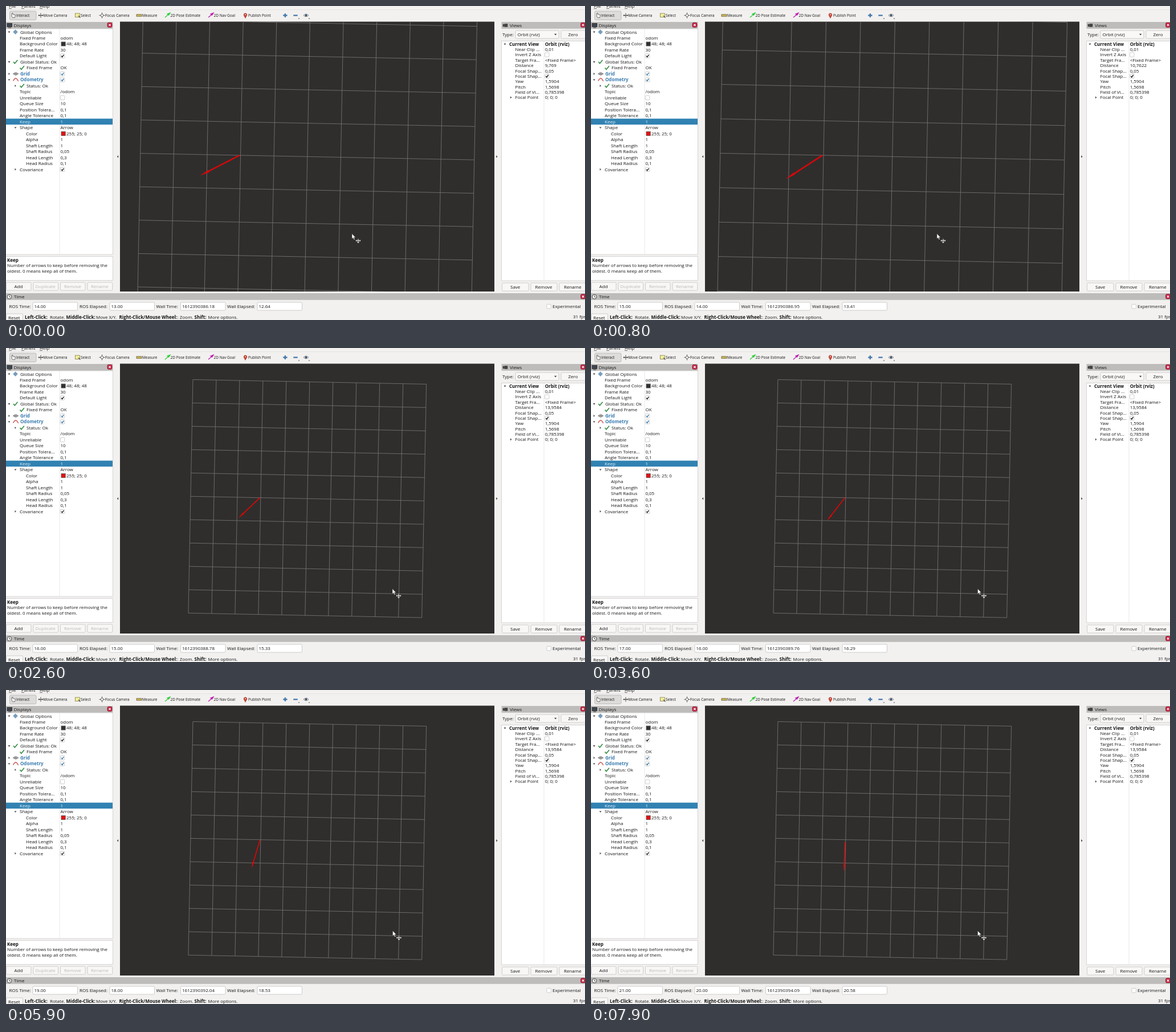
Animation, 1016 px wide and 551 px high, one loop 8 s. Source, as an HTML page:

```html
<!DOCTYPE html>
<html lang="en">
<head>
<meta charset="utf-8">
<title>Odometry view</title>
<style>
html, body { margin: 0; width: 100%; height: 100%; overflow: hidden; background: #f2f1f0; }
svg { display: block; width: 1016px; height: 551px; }
text { font: 8px "Open Sans", "Noto Sans", sans-serif; fill: #161616; white-space: pre; }
.b { font-weight: 700; }
.s { font-size: 6.5px; }
.blue { fill: #3a7cb0; }
.off { fill: #bab8b6; }
.sel { fill: #e4f0f8; }
</style>
</head>
<body>
<svg id="stage" viewBox="0 0 1016 551"></svg>
<script>
const out = [];
const put = s => out.push(s);
const text = (x, y, s, cls = '', id = '') =>
  put(`<text x="${x}" y="${y}" class="${cls}" id="${id}">${s.replace(/</g, '&lt;')}</text>`);
const rect = (x, y, w, h, fill, stroke = 'none', r = 0) =>
  put(`<rect x="${x}" y="${y}" width="${w}" height="${h}" rx="${r}" fill="${fill}" stroke="${stroke}" stroke-width=".8"/>`);
const path = (d, stroke, w = 1, fill = 'none') =>
  put(`<path d="${d}" fill="${fill}" stroke="${stroke}" stroke-width="${w}"/>`);
const dot = (x, y, r, fill, stroke = 'none') =>
  put(`<circle cx="${x}" cy="${y}" r="${r}" fill="${fill}" stroke="${stroke}"/>`);

const open = (x, y) => path(`M${x - 2} ${y - 1}h4l-2 2.6z`, 'none', 0, '#444');
const shut = (x, y) => path(`M${x - 1} ${y - 2}v4l2.4 -2z`, 'none', 0, '#444');
const tick = (x, y) => path(`M${x - 3.5} ${y}l2.4 2.8l5 -6`, '#2b8a3a', 1.5);

function check(x, y, on, color = '#222') {
  rect(x - 3.7, y - 3.7, 7.4, 7.4, '#fff', '#c4c2c0', 1);
  if (on) path(`M${x - 2.1} ${y}l1.6 2l2.8 -4`, color, 1.4);
}
function button(x, y, w, label, tx, cls = '') {
  rect(x, y, w, 14, '#f8f7f6', '#c5c3c1', 1.5);
  text(tx, y + 9.8, label, cls);
}
function bar(x, y, w) { rect(x, y, w, 11.8, '#bdbcbb'); }
function close(x, y) {
  rect(x - 4, y - 4, 8, 8, '#c9203f', '#8c1a30', 2);
  path(`M${x - 1.7} ${y - 1.7}l3.4 3.4m0 -3.4l-3.4 3.4`, '#fff', 1.1);
}

function toolbar() {
  [[5, 'File'], [27, 'Panels'], [59, 'Help']].forEach(([x, s]) => {
    text(x, 2.8, s);
    path(`M${x} 4.4h5`, '#333', .7);
  });
  path('M0 6.5H1016', '#e2e0de', .8);
  rect(6.5, 9, 46.5, 15.5, '#dddcda', '#b4b2b0', 2);
  path('M10 13v5l1.5 2.5h4l1 -5l-4.6 -.8v-2.4z', '#555', .8, '#f5f5f5');
  path('M57 16.5h8m-4 -4v8m-4 -4l1.5 -1.5m-1.5 1.5l1.5 1.5m6.5 -1.5l-1.5 -1.5m1.5 1.5l-1.5 1.5', '#444', 1);
  rect(121.5, 13, 8, 6.5, '#f3ef9c', '#807d40');
  path('M127 17l3.5 3.5', '#555', 1.2);
  dot(168.5, 16.5, 2.5, 'none', '#777');
  path('M163.5 16.5h3m4 0h3m-5 -5v3m0 4v3', '#555', 1);
  rect(229, 14.8, 9, 3.4, '#c9b45c', '#6e6335');
  const ray = (x, c) => path(`M${x} 20l6 -5M${x + 4} 14l5 -2l-2.5 4z`, c, 1.3, c);
  ray(279, '#2fce3b');
  ray(355, '#c01bb0');
  path('M420 21.5c-1 -2.6 -2.8 -4 -2.8 -6a2.8 2.8 0 0 1 5.6 0c0 2 -1.8 3.4 -2.8 6z', '#9c3326', .5, '#c8402f');
  dot(420, 15.2, 1, '#f7dcd8');
  path('M486.3 16.5h7.2m-3.6 -3.6v7.2', '#4679ad', 2.3);
  path('M504.3 16.5h7.4', '#4679ad', 2.3);
  path('M522 16.5q4.5 -5 9 0q-4.5 4.5 -9 0z', '#777', .9, '#eee');
  dot(526.5, 16.3, 1.9, '#35506e');
  [514, 532].forEach(x => path(`M${x - 1.4} 21.5h2.8l-1.4 1.6z`, 'none', 0, '#444'));
  [[18, 'Interact'], [65.5, 'Move Camera'], [131, 'Select'], [174, 'Focus Camera'], [239, 'Measure'],
   [288.5, '2D Pose Estimate'], [364.5, '2D Nav Goal'], [425, 'Publish Point']]
    .forEach(([x, s]) => text(x, 18.9, s, 's'));
}

// rows: indent, name, value, class, arrow ("v" open, ">" shut), checkbox (0 or 1)
const displays = [
  [25, 'Global Options', '', '', 'v'],
  [24, 'Fixed Frame', 'odom'],
  [24, 'Background Color', '48; 48; 48'],
  [24, 'Frame Rate', '30'],
  [24, 'Default Light', '', '', '', 1],
  [25, 'Global Status: Ok', '', '', 'v'],
  [36, 'Fixed Frame', 'OK'],
  [25, 'Grid', '', 'b blue', '>', 1],
  [25, 'Odometry', '', 'b blue', 'v', 1],
  [36, 'Status: Ok', '', '', '>'],
  [24, 'Topic', '/odom'],
  [24, 'Unreliable', '', '', '', 0],
  [24, 'Queue Size', '10'],
  [24, 'Position Tolera...', '0,1'],
  [24, 'Angle Tolerance', '0,1'],
  [24, 'Keep', '1', 'sel'],
  [24, 'Shape', 'Arrow', '', 'v'],
  [35, 'Color', '255; 25; 0'],
  [35, 'Alpha', '1'],
  [35, 'Shaft Length', '1'],
  [35, 'Shaft Radius', '0,05'],
  [35, 'Head Length', '0,3'],
  [35, 'Head Radius', '0,1'],
  [24, 'Covariance', '', '', '>', 1]
];
const views = [
  [883, 'Current View', 'Orbit (rviz)', 'b', 'v'],
  [893.5, 'Near Clip ...', '0,01'],
  [893.5, 'Invert Z Axis', '', '', '', 0],
  [893.5, 'Target Fra...', '<Fixed Frame>'],
  [893.5, 'Distance', '9,769'],
  [893.5, 'Focal Shap...', '0,05'],
  [893.5, 'Focal Shap...', '', '', '', 1],
  [893.5, 'Yaw', '1,5904'],
  [893.5, 'Pitch', '1,5698'],
  [893.5, 'Field of Vi...', '0,785398'],
  [893.5, 'Focal Point', '0; 0; 0', '', '>']
];

function tree(rows, y0, pitch, valueX, arrowX) {
  rows.forEach(([x, name, value, cls = '', arrow, box], i) => {
    const y = y0 + pitch * i;
    if (cls === 'sel') rect(0, y - 5.3, 187, 10.5, '#3182b2');
    text(x, y + 2.9, name, cls);
    const swatch = { '48; 48; 48': '#303030', '255; 25; 0': '#e60f10' }[value];
    if (swatch) rect(97, y - 3.5, 7.2, 7, swatch, '#555');
    if (value) text(valueX + (swatch ? 10.5 : 0), y + 2.9, value, cls, name === 'Distance' ? 'dist' : '');
    if (arrow) (arrow === 'v' ? open : shut)(arrowX(x), y);
    if (box !== undefined) check(valueX + 3.6, y, box, cls ? '#4380ae' : '#222');
  });
}

function leftPanel() {
  bar(0, 28, 187.5);
  rect(2, 30.5, 8.5, 6, '#3e4650', '#222');
  path('M4 38.2h5', '#333', 1);
  text(13.5, 36.8, 'Displays');
  close(182, 33.3);
  rect(-1, 40, 188.4, 396, '#fff', '#cfcdcb');
  path('M94 40V436', '#e3e2e1', .8);
  tree(displays, 45.6, 10.49, 95.5, x => x > 30 ? 16.5 : x === 24 ? 16.5 : 5.5);
  dot(16.5, 45.6, 2.7, '#a9c6de', '#5682a8');
  path('M16.5 41.4v8.4m-4.2 -4.2h8.4', '#5682a8', .8);
  tick(16.5, 98);
  tick(28, 108.5);
  tick(28, 140);
  path('M12.5 119l4.5 -2.5l4.5 2.5l-4.5 2.5zm2.2 -1.2l4.6 2.5m0 -2.5l-4.6 2.5', '#555', .9);
  path('M12.5 131.5q3 -5 5 -4.5t4 5', '#c8322c', 1.2);
  rect(-1, 439.5, 188.4, 42, '#fff', '#cfcdcb');
  text(2, 449, 'Keep', 'b');
  text(2, 458.3, 'Number of arrows to keep before removing the');
  text(2, 467.5, 'oldest. 0 means keep all of them.');
  button(.5, 485, 43.5, 'Add', 14.5);
  button(48, 485, 43.5, 'Duplicate', 51.5, 'off');
  button(95.5, 485, 43.5, 'Remove', 102, 'off');
  button(143, 485, 43.8, 'Rename', 149, 'off');
}

function rightPanel() {
  bar(869.5, 28, 147);
  path('M872 32h2.5v4h-2.5zM875 31.5h5v5h-5z', '#333', .5, '#444');
  text(884, 36.8, 'Views');
  close(1012.5, 33.3);
  text(871, 52.8, 'Type:');
  rect(894, 43, 76, 14, '#f9f8f7', '#c2c0be', 1.5);
  text(897.5, 52.8, 'Orbit (rviz)');
  path('M962 48.8h4.4l-2.2 2.6z', 'none', 0, '#444');
  button(974, 43, 45, 'Zero', 986.5);
  rect(869.5, 61.5, 150, 420.5, '#fff', '#cfcdcb');
  path('M944 62V482', '#e3e2e1', .8);
  tree(views, 66.8, 9.37, 945.7, x => x < 890 ? 875.5 : 886);
  button(870.5, 486, 46.5, 'Save', 885);
  button(921, 486, 46, 'Remove', 928.5);
  button(971, 486, 48, 'Rename', 979);
}

function bottomPanel() {
  bar(0, 504, 1016);
  dot(6, 510.2, 3.9, '#f4f4f4', '#444');
  path('M6 507.8v2.5l2 1', '#333', .9);
  text(14, 513.3, 'Time');
  close(1012.5, 509.8);
  [[5.5, 'ROS Time:', 47, 'ros'], [129, 'ROS Elapsed:', 182, 'rosE'],
   [263.5, 'Wall Time:', 306.5, 'wall'], [388, 'Wall Elapsed:', 441, 'wallE']].forEach(([x, s, fx, id]) => {
    text(x, 530.2, s);
    rect(fx, 520, 78.5, 14, '#fff', '#c2c0be', 1.5);
    text(fx + 2.5, 530, '', '', id);
  });
  check(952.7, 527.2, 0);
  text(959, 530.2, 'Experimental');
  rect(.5, 540, 29, 14, '#f8f7f6', '#c5c3c1', 1.5);
  text(4, 549.5, 'Reset');
  [[33, 'Left-Click:', 1], [77, 'Rotate.'], [105.5, 'Middle-Click:', 1], [158, 'Move X/Y.'],
   [198.5, 'Right-Click/Mouse Wheel:', 1], [300.5, ': Zoom.'], [330.5, 'Shift:', 1], [354.5, 'More options.']]
    .forEach(([x, s, bold]) => text(x, 549.4, s, bold ? 'b' : ''));
  text(995, 548, '', '', 'fps');
}

function scene() {
  put('<clipPath id="view"><rect x="200" y="27.5" width="657" height="473.5"/></clipPath>');
  rect(200, 27.5, 657, 473.5, '#2f2e2d');
  put('<g clip-path="url(#view)"><path id="grid" fill="none" stroke="#737271" stroke-width=".9"/>' +
      '<path id="arrow" fill="#e00505"/></g>');
  put('<g id="cursor"><path d="M0 0v9l2.1 -1.8l1.6 3.5l1.5 -.7l-1.6 -3.3h2.8z" fill="#fff" stroke="#222" stroke-width=".5"/>' +
      '<path d="M7 12.2h8M11 9v7M9.3 14.3l1.7 2l1.7 -2M8.3 11l-1.4 1.2l1.4 1.2M13.7 11l1.4 1.2l-1.4 1.2" fill="none" stroke="#f2f2f2" stroke-width="1"/></g>');
  path('M197.2 262v4.4l-2.4 -2.2z', 'none', 0, '#444');
  path('M860.2 262v4.4l2.4 -2.2z', 'none', 0, '#444');
}

toolbar();
scene();
leftPanel();
rightPanel();
bottomPanel();
document.getElementById('stage').innerHTML = out.join('');

const $ = id => document.getElementById(id);
const el = Object.fromEntries(['grid', 'arrow', 'cursor', 'dist', 'ros', 'rosE', 'wall', 'wallE', 'fps'].map(k => [k, $(k)]));

// key tables: [ms, value]
const cellKeys = [[0, 58.6], [300, 58.6], [700, 60.4], [800, 60.4], [900, 42.6], [1000, 40.97]];
const angleKeys = [[0, 62.8], [800, 57], [1400, 52.2], [2600, 46.6], [4600, 29.1], [5900, 16.8], [7900, 1.7]];
const lengthKeys = [[0, 1.305], [800, 1.245], [1400, 1.235], [7900, 1.23]];
const dropKeys = [[0, 0], [4600, 0], [5900, .02], [7900, .1]];
const wallKeys = [[0, 6.18], [800, 6.95], [1400, 7.53], [2600, 8.78], [4600, 10.73], [5900, 12.04], [7900, 14.09]];
const elapsedKeys = [[0, 12.64], [800, 13.41], [1400, 14.05], [2600, 15.33], [4600, 17.25], [5900, 18.53], [7900, 20.58]];
const mouseXKeys = [[1800, 607], [2500, 678], [2900, 678], [3000, 678.5]];
const mouseYKeys = [[1800, 399.5], [2500, 422.5]];

function at(keys, t) {
  if (t <= keys[0][0]) return keys[0][1];
  for (let i = 1; i < keys.length; i++) {
    const [t0, a] = keys[i - 1], [t1, b] = keys[i];
    if (t <= t1) return a + (b - a) * (t - t0) / (t1 - t0);
  }
  return keys[keys.length - 1][1];
}

const CX = 528.8, CY = 264.3, SKEW = .0195;
const place = (c, u, v) => [CX + c * (u - v * SKEW), CY + c * (v + u * SKEW)];
const poly = pts => 'M' + pts.map(p => p.map(n => n.toFixed(2)).join(' ')).join('L');

function gridPath(c) {
  let d = '';
  for (let i = -5; i <= 5; i++) {
    d += poly([place(c, i, -5), place(c, i, 5)]) + poly([place(c, -5, i), place(c, 5, i)]);
  }
  return d;
}

function arrowPath(c, t) {
  const a = at(angleKeys, t) * Math.PI / 180, len = at(lengthKeys, t) * c;
  const dx = -Math.sin(a), dy = Math.cos(a);
  const [x0, y0] = place(c, -2.03, at(dropKeys, t));
  const pt = (along, side) => [x0 + dx * along - dy * side, y0 + dy * along + dx * side];
  const neck = len - .27 * c, w = .02 * c, h = .036 * c;
  return poly([pt(0, w), pt(neck, w), pt(neck, h), pt(len, .3), pt(len, -.3), pt(neck, -h), pt(neck, -w), pt(0, -w)]) + 'z';
}

function draw(t) {
  const c = at(cellKeys, t), ros = 14 + Math.max(0, Math.floor((t + 350) / 1050));
  el.grid.setAttribute('d', gridPath(c));
  el.arrow.setAttribute('d', arrowPath(c, t));
  el.cursor.setAttribute('transform', `translate(${at(mouseXKeys, t)} ${at(mouseYKeys, t)})`);
  el.dist.textContent = t < 800 ? '9,769' : t < 900 ? '10,7622' : t < 1000 ? '13,4383' : '13,9584';
  el.ros.textContent = ros + '.00';
  el.rosE.textContent = ros - 1 + '.00';
  el.wall.textContent = (1612390380 + at(wallKeys, t)).toFixed(2);
  el.wallE.textContent = at(elapsedKeys, t).toFixed(2);
  el.fps.textContent = (t >= 6800 && t < 7600 ? 30 : 31) + ' fps';
}

const start = performance.now();
function loop(now) {
  const t = Math.max(0, now - start) % 8000;
  draw(Math.floor(t / 100) * 100);
  requestAnimationFrame(loop);
}
draw(0);
requestAnimationFrame(loop);
</script>
</body>
</html>
```
